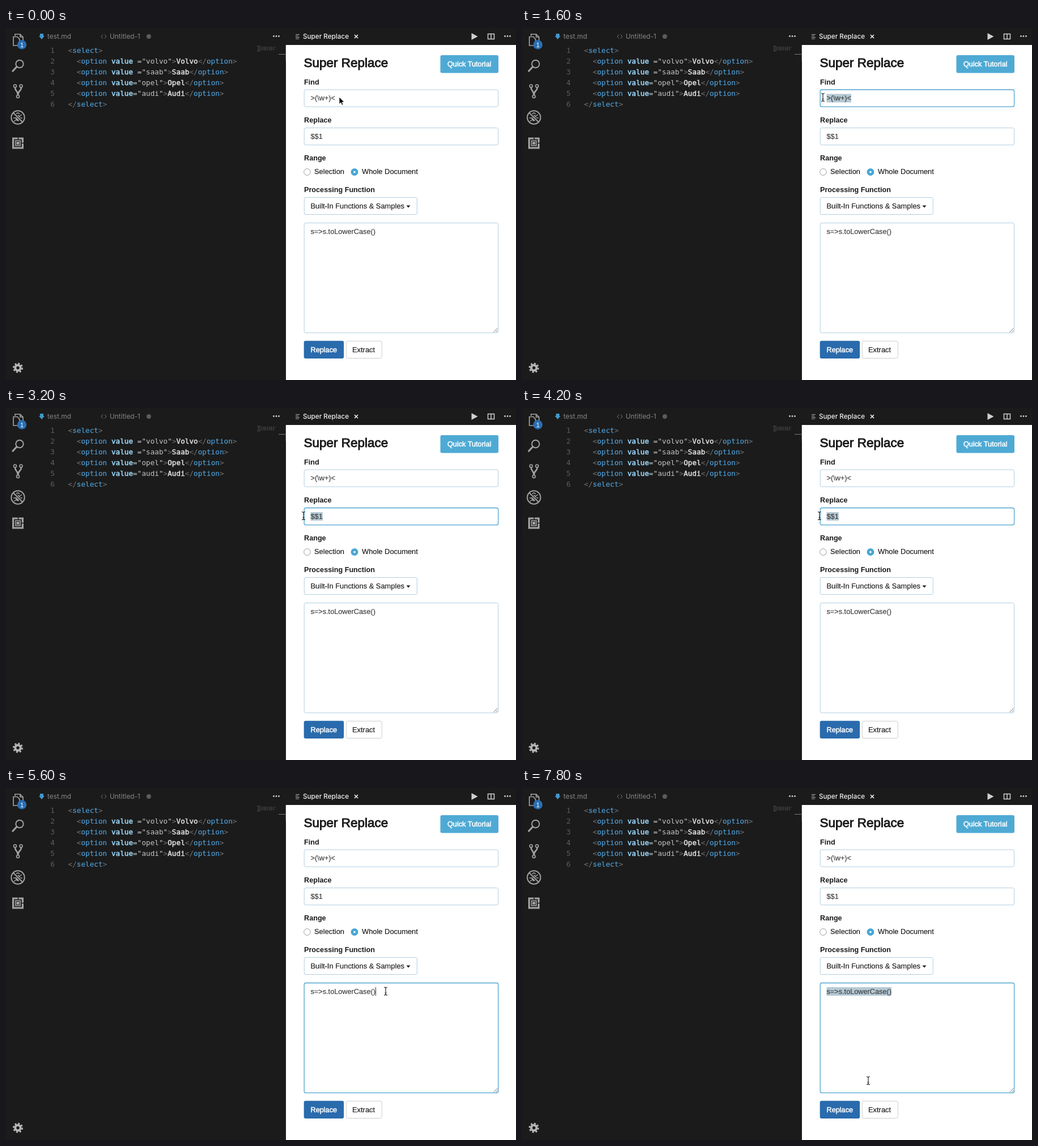
Recreate the animation shown at these times as an HTML page. Size 900x622 px, loop 8 s.

```html
<!DOCTYPE html>
<html lang="en">
<head>
<meta charset="utf-8">
<title>Super Replace</title>
<style>
  html, body { margin: 0; width: 100%; height: 100%; overflow: hidden; background: #1b1b1b; }
  svg { display: block; width: 100%; height: 100%; }
  text { white-space: pre; }
  .code { font: 12.7px "DejaVu Sans Mono", monospace; fill: #c4c4c4; }
  .code .p { fill: #747474; }
  .code .t { fill: #4f9fd8; stroke: #4f9fd8; stroke-width: .15; }
  .code .a { fill: #9cdcfe; stroke: #9cdcfe; stroke-width: .45; }
  .code .w { fill: #e2e2e2; stroke: #e2e2e2; stroke-width: .45; }
  .num { fill: #5c5c5c; text-anchor: end; }
  .tab { font: 11.9px Inter, sans-serif; fill: #858585; }
  .tab.on { font-size: 11.7px; font-weight: 500; fill: #f0f0f0; }
  .ui { font: 12.9px "Liberation Sans", sans-serif; fill: #1a1a1a; }
  .ui text { stroke: #1a1a1a; stroke-width: .15; }
  .ui .label { font-size: 12.65px; font-weight: bold; stroke: none; }
  .ui .value { font-size: 12.73px; fill: #3c3c3c; stroke: #3c3c3c; }
  .ui .title { font-size: 22.5px; stroke-width: .9; }
  .ui .button { font-size: 12.7px; fill: #fff; stroke: #fff; stroke-width: .5; }
  .box { fill: #fff; stroke: #b3cfe0; }
  .box.focus { stroke: #4fa5d0; stroke-width: 1.3; }
  .icon { fill: none; stroke: #a2a2a2; stroke-width: 2; }
  .solid { fill: #a2a2a2; }
</style>
</head>
<body>
<svg viewBox="0 0 900 622" preserveAspectRatio="none">
  <rect width="900" height="622" fill="#1b1b1b"/>
  <rect x="494" y="30" width="406" height="592" fill="#fff"/>

  <!-- activity bar -->
  <g class="icon">
    <path d="M16 14V11H25L30 16V27H24M25 11V16H30M13 15.500H20L24 20V31H13Z" stroke-width="1.700"/>
    <circle cx="24" cy="63.500" r="6.700"/>
    <path d="M19 68.500L12 76" stroke-width="3.200" stroke-linecap="round"/>
    <path d="M16 105C16 112 21 110 21 119M27 105C27 112 21 110 21 119" stroke-width="2.600"/>
    <g fill="#1b1b1b" stroke-width="1.700">
      <circle cx="16" cy="102.500" r="2.500"/><circle cx="26.500" cy="102.500" r="2.500"/><circle cx="21" cy="121" r="2.500"/>
    </g>
    <ellipse class="solid" cx="21" cy="159" rx="4" ry="5.500" stroke="none"/>
    <path d="M14 153L18 156M13 159H29M14 165L18 162M28 153L24 156M28 165L24 162M18 152Q21 148 24 152" stroke-width="1.500"/>
    <path d="M13 150L29 166" stroke="#1b1b1b" stroke-width="4.500"/>
    <circle cx="21" cy="158" r="11.700"/>
    <path d="M13 150L29 166"/>
  </g>
  <circle cx="28" cy="29.500" r="8.200" fill="#2a6fb3"/>
  <text x="28" y="33.500" text-anchor="middle" font-family="Liberation Sans, sans-serif" font-size="11" fill="#fff">1</text>
  <rect class="solid" x="11" y="193.500" width="20" height="20"/>
  <rect x="15" y="197.500" width="12" height="12" fill="none" stroke="#1b1b1b" stroke-width="1.700"/>
  <rect x="18" y="200.500" width="6" height="6" fill="#a2a2a2" stroke="#1b1b1b" stroke-width="1"/>
  <path d="M21.500 193V198M26.500 203.500H31" stroke="#1b1b1b" stroke-width="1.500"/>
  <circle cx="21" cy="600.500" r="7.700" fill="none" stroke="#b5b5b5" stroke-width="2.800" stroke-dasharray="3.024 3.024"/>
  <circle cx="21" cy="600.500" r="4.700" fill="none" stroke="#b5b5b5" stroke-width="4"/>

  <!-- editor tabs -->
  <path d="M60 10H66V14H68L63 20L58 14H60Z" fill="#3f98cc"/>
  <text class="tab" x="73" y="19">test.md</text>
  <path d="M171 11.500L168 15L171 18.500M174 11.500L177 15L174 18.500" fill="none" stroke="#777"/>
  <text class="tab" x="183" y="19">Untitled-1</text>
  <circle cx="252" cy="15" r="4" fill="#5c5c5c"/>
  <path d="M511 11.500H518M511 14H516M511 16.500H518M511 19H517" stroke="#aaa"/>
  <text class="tab on" x="524" y="19">Super Replace</text>
  <path d="M615 12L621 18M621 12L615 18" stroke="#eee" stroke-width="1.700"/>
  <path d="M821.500 9L832.500 15L821.500 21Z" fill="#d0d0d0"/>
  <path d="M850.500 10.500H861.500V19.500H850.500ZM856 10V20M850 10.500H862" fill="none" stroke="#d0d0d0" stroke-width="1.500"/>
  <g fill="#d0d0d0">
    <circle cx="472.500" cy="14.500" r="1.400"/><circle cx="477" cy="14.500" r="1.400"/><circle cx="481.500" cy="14.500" r="1.400"/>
    <circle cx="880.500" cy="14.500" r="1.400"/><circle cx="885" cy="14.500" r="1.400"/><circle cx="889.500" cy="14.500" r="1.400"/>
  </g>

  <g id="code" class="code"></g>
  <g stroke="#585858" stroke-width=".8">
    <path d="M443 32H449M443 40.500H449"/>
    <path d="M444.500 33.700H476M444.500 35.400H475M444.500 37.100H474M444.500 38.800H474" stroke-dasharray="3 1.500 2 1.500 2 1"/>
  </g>
  <path d="M481 46.500H493" stroke="#777"/>
  <path d="M493.500 30V58" stroke="#444"/>

  <!-- form -->
  <g class="ui">
    <text class="title" x="525.500" y="69">Super Replace</text>
    <rect x="766.500" y="48" width="102.500" height="31.500" rx="3" fill="#4eaad4"/>
    <text class="button" x="779" y="68">Quick Tutorial</text>
    <text class="label" x="526" y="99.500">Find</text>
    <text class="label" x="526" y="166.700">Replace</text>
    <text class="label" x="526" y="234.300">Range</text>
    <circle cx="531.500" cy="254.500" r="5.800" fill="#fff" stroke="#999"/>
    <text x="544" y="258">Selection</text>
    <circle cx="615" cy="254.500" r="6.500" fill="#4ba7d3"/>
    <circle cx="615" cy="254.500" r="1.800" fill="#fff"/>
    <text x="628" y="258">Whole Document</text>
    <text class="label" x="526" y="290">Processing Function</text>
    <rect class="box" x="526.300" y="299.500" width="199" height="30" rx="2.500"/>
    <text x="537.500" y="319">Built-In Functions &amp; Samples</text>
    <path d="M706.500 313.500H713.500L710 317.500Z"/>
    <g id="fields"></g>
    <path d="M860.500 537.500L867.500 530.500M864.500 537.500L867.500 534.500" stroke="#777"/>
    <rect x="525.700" y="552.700" width="70.500" height="31.300" rx="3" fill="#2a6bad"/>
    <text class="button" x="537.500" y="572.500">Replace</text>
    <rect x="600.300" y="553.300" width="63" height="30.300" rx="3" fill="#fff" stroke="#ccc"/>
    <text x="611" y="572.500">Extract</text>
  </g>

  <path id="caret" d="M652.500 352V367" stroke="#333"/>
  <path id="arrow" d="M0 0V12.500L2.900 9.800L4.900 14.300L7 13.400L5 9H9Z" stroke="#fff" stroke-width=".8"/>
  <path id="beam" d="M-3 -7Q0 -7 0 -5Q0 -7 3 -7M0 -5V5M-3 7Q0 7 0 5Q0 7 3 7M-1.500 3H1.500" fill="none" stroke="#222" stroke-width="1.200"/>
</svg>
<script>
const byId = id => document.getElementById(id);
const escapeHtml = s => s.replace(/&/g, "&amp;").replace(/</g, "&lt;").replace(/>/g, "&gt;");
const span = (cls, s) => `<tspan class="${cls}">${escapeHtml(s)}</tspan>`;
const tag = (open, name, rest = span("p", ">")) => span("p", open) + span("t", name) + rest;

const option = (assign, name) => "  " +
  tag("<", "option", " " + span("a", "value") + `${assign}"${name.toLowerCase()}"` + span("p", ">")) +
  span("w", name) + tag("</", "option");
const lines = [
  tag("<", "select"),
  option(" =", "Volvo"), option(" =", "Saab"), option("=", "Opel"), option("=", "Audi"),
  tag("</", "select"),
];
byId("code").innerHTML = lines.map((line, i) => {
  const y = 43.5 + i * 19.15;
  return `<text class="num" x="86" y="${y}">${i + 1}</text><text x="109.500" y="${y}">${line}</text>`;
}).join("");

// Each field has focus between from and to; its text is selected by dragging left after selectAt.
const fields = [
  { text: ">(\\w+)<", top: 109, height: 30.2, end: 581, from: 200, to: 2600, selectAt: 400 },
  { text: "$$1", top: 176.5, height: 30.2, end: 559, from: 2600, to: 5400, selectAt: 2800 },
  { text: "s=>s.toLowerCase()", top: 344.5, height: 194.2, end: 652, from: 5400, to: 8000, selectAt: 5800 },
];
byId("fields").innerHTML = fields.map(f => `<g>
  <rect class="box" x="526.200" y="${f.top}" width="342.400" height="${f.height}" rx="3"/>
  <rect y="${f.top + 7.5}" height="15" fill="#b5c9d4"/>
  <text class="value" x="537.500" y="${f.top + 19.3}">${escapeHtml(f.text)}</text></g>`).join("");
fields.forEach((f, i) => [f.box, f.mark] = byId("fields").children[i].children);

// Pointer stops: time, x, y
const stops = [
  [0, 588, 122], [200, 586, 123], [400, 580, 123], [800, 531, 122.5], [1800, 531, 122.5],
  [2400, 582, 183], [2600, 568, 190], [2800, 562, 190], [3200, 525, 190.5], [4600, 525, 190.5],
  [5400, 670, 359], [5600, 670, 359], [6400, 526, 359.5], [7200, 526, 359.5], [7800, 611, 517],
];

function pointerAt(t) {
  const i = stops.findIndex(s => s[0] > t);
  if (i < 0) return stops[stops.length - 1].slice(1);
  const [t0, x0, y0] = stops[i - 1], [t1, x1, y1] = stops[i];
  const k = (t - t0) / (t1 - t0), ease = k * k * (3 - 2 * k);
  return [x0 + (x1 - x0) * ease, y0 + (y1 - y0) * ease];
}

const show = (node, on) => node.setAttribute("visibility", on ? "visible" : "hidden");

function draw(now) {
  const t = Math.floor(now % 8000 / 200) * 200;
  const [x, y] = pointerAt(t);
  for (const f of fields) {
    const focused = t >= f.from && t < f.to;
    f.box.classList.toggle("focus", focused);
    const left = t >= f.selectAt + 600 ? 537.5 : Math.min(f.end, Math.max(537.5, x));
    f.mark.setAttribute("x", left);
    f.mark.setAttribute("width", f.end - left);
    show(f.mark, focused && t >= f.selectAt);
  }
  const pointer = byId(t < 200 ? "arrow" : "beam");
  pointer.setAttribute("transform", `translate(${x} ${y})`);
  show(byId("arrow"), t < 200);
  show(byId("beam"), t >= 200);
  show(byId("caret"), t >= 5400 && t < 5800);
  requestAnimationFrame(draw);
}
requestAnimationFrame(draw);
</script>
</body>
</html>
```
